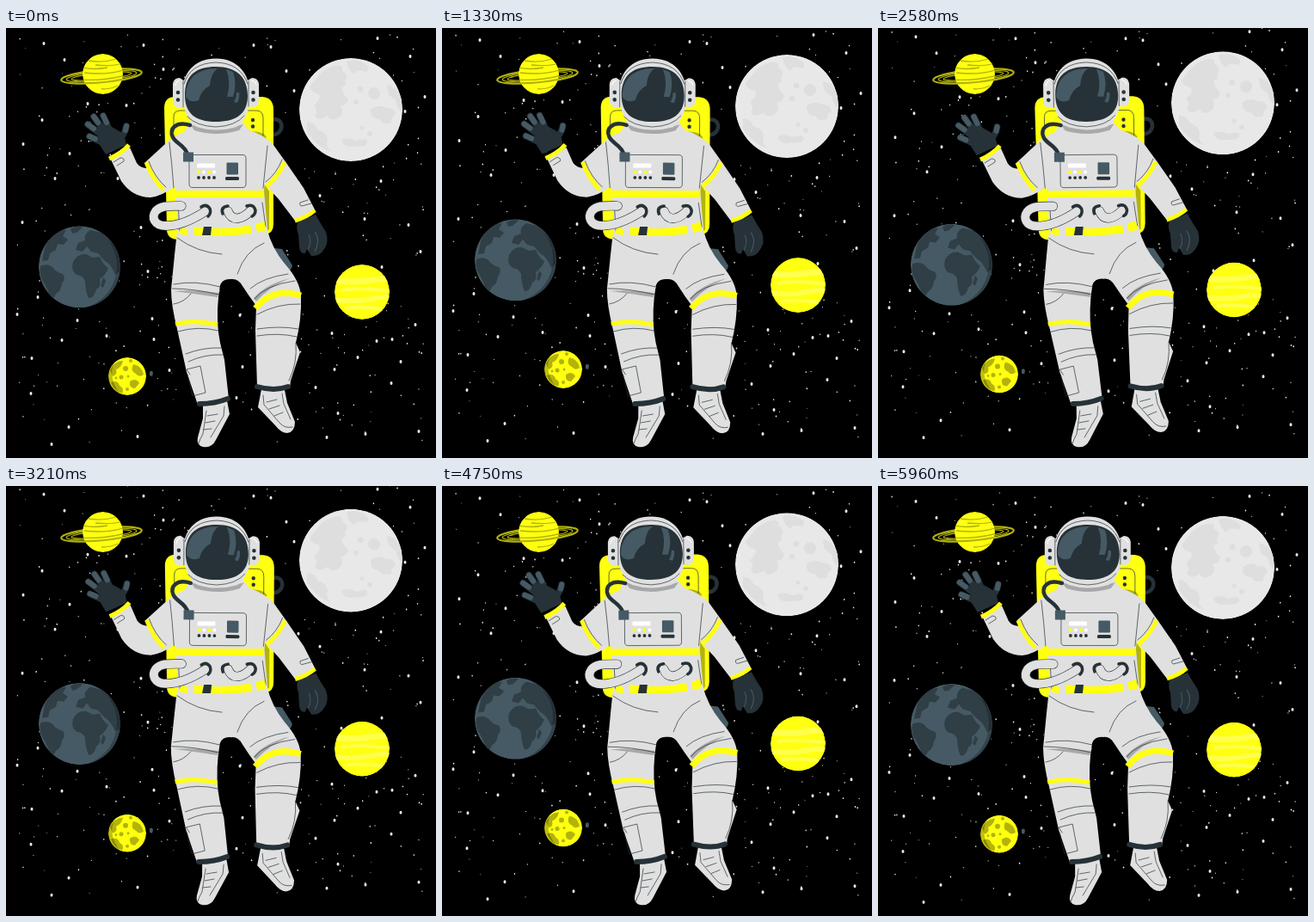
Write an HTML page that moves like this. It is 500x500 px and loops after 6 s.

```html
<!DOCTYPE html>
<html lang="en">
<head>
<meta charset="utf-8">
<title>Floating astronaut</title>
<style>
html, body { margin: 0; width: 100%; height: 100%; overflow: hidden; background: #000; }
svg { display: block; width: 100vw; height: 100vh; }
.suit { fill: #e0e0e0; }
.yellow { fill: #ffff10; }
.olive { fill: #b3b30b; }
.dark { fill: #263238; }
.slate { fill: #455a64; }
.white { fill: #fff; }
.line, .stripe, .cuff, .hose, .ring, .fingers, .tube { fill: none; }
.line { stroke: #263238; stroke-width: .7; stroke-linecap: round; stroke-linejoin: round; }
.stripe { stroke: #ffff10; stroke-width: 5; }
.wide { stroke-width: 7; }
.cuff { stroke: #263238; stroke-width: 6; stroke-linecap: round; }
.hose { stroke: #263238; stroke-width: 4.5; stroke-linecap: round; }
.ring { stroke: #263238; stroke-width: 3.5; stroke-linecap: round; }
.fingers { stroke: #263238; stroke-width: 7.5; stroke-linecap: round; }
.tips { stroke: #455a64; stroke-width: 6; }
.tube { stroke-width: 11; stroke: #263238; stroke-linecap: round; }
.core { stroke-width: 9.8; stroke: #e0e0e0; }
.band { fill: none; stroke: #b3b30b; stroke-width: 1.3; }
.shade { fill: #000; opacity: .25; }
</style>
</head>
<body>
<svg viewBox="0 0 500 500">
<defs>
  <clipPath id="moonClip"><circle cx="401" cy="95" r="60"/></clipPath>
  <clipPath id="earthClip"><circle cx="85.5" cy="277.8" r="47.5"/></clipPath>
  <clipPath id="sunClip"><circle cx="414" cy="307" r="32"/></clipPath>
  <clipPath id="rockClip"><circle cx="141" cy="405" r="22"/></clipPath>
  <clipPath id="saturnClip"><circle cx="112.5" cy="53.5" r="23.5"/></clipPath>
  <path id="tubes" d="M232 213C217 223 201 230 186 230C172 230 169 220 174 213C180 206 190 207 204 207M258 213C263 226 275 222 284 213"/>
</defs>

<path id="stars" fill="#ebebeb"/>

<g id="moon" clip-path="url(#moonClip)">
  <circle cx="401" cy="95" r="60" fill="#e8e8e8"/>
  <g fill="#dedede">
    <path d="M359 61Q368 47 382 44Q393 42 391 50Q400 54 394 62Q397 68 390 69Q393 80 398 82Q396 92 389 90Q394 99 387 104Q378 110 374 102Q363 110 359 101Q364 97 358 90Q367 83 364 77Q354 75 353 68Z"/>
    <path d="M396 39Q405 35 416 41Q425 46 419 51Q408 47 405 54Q397 48 396 39Z"/>
    <path d="M424 94Q434 88 441 93Q452 92 453 101Q447 104 448 110Q438 114 434 106Q423 106 424 94Z"/>
    <path d="M350 109Q360 110 362 118Q373 121 374 130Q371 138 379 144Q363 140 350 121Z"/>
    <path d="M443 66Q455 68 460 82L461 98Q454 92 453 83Q443 80 443 66Z"/>
    <circle cx="428" cy="76" r="7"/><circle cx="412" cy="71" r="3.5"/>
    <circle cx="366" cy="129" r="7"/><circle cx="407" cy="86" r="3"/>
    <circle cx="414" cy="116" r="2.5"/><circle cx="423" cy="123" r="3"/>
    <path d="M390 130Q399 126 407 131L417 129Q424 132 417 137L401 138Q393 139 390 130Z"/>
  </g>
</g>

<g id="earth" clip-path="url(#earthClip)">
  <circle cx="85.500" cy="277.8" r="47.5" class="slate"/>
  <g fill="#303e46">
    <path d="M40 277Q48 273 54 278Q58 284 66 286Q70 291 65 297Q64 306 58 309Q55 317 52 313Q47 301 44 296Q38 288 40 277Z"/>
    <path d="M78 272Q83 262 93 263L101 267L109 266Q114 277 119 279Q116 287 109 292Q111 301 105 304Q102 315 96 314Q92 305 92 294Q90 288 82 287Q75 282 78 272Z"/>
    <path d="M81 258L84 250L92 247Q90 240 98 235L111 238L125 252Q133 267 133 282L127 287Q122 274 114 270L107 262L99 260L94 254L89 260Z"/>
    <path d="M45 256Q50 243 62 236L70 235L66 242L72 246L67 252L60 251L58 258L51 262L49 270L42 271Z"/>
    <path d="M75 234Q82 229 89 232L82 238L77 239Z"/>
    <path d="M113 290L116 294L113 302L110 300Z"/>
  </g>
  <path class="shade" d="M108 236A47.5 47.5 0 0 1 92 325A50 50 0 0 0 108 236Z"/>
</g>

<g id="sun" clip-path="url(#sunClip)">
  <circle cx="414" cy="307" r="32" class="yellow"/>
  <g fill="none" stroke="#ffff4d">
    <path stroke-width="7" d="M380 293Q402 297 424 293T448 295"/>
    <path stroke-width="4" d="M390 305Q412 301 448 306M394 326Q414 323 438 327"/>
    <path stroke-width="6" d="M380 316Q404 319 424 315T448 316"/>
  </g>
</g>

<g id="rock">
  <path class="slate" d="M167 400Q170 397 171 401L170 405L167 404Z"/>
  <g clip-path="url(#rockClip)">
    <circle cx="141" cy="405" r="22" class="yellow"/>
    <g class="olive">
      <path d="M121 398Q127 386 136 387Q134 395 128 397Q130 403 124 405Z"/>
      <path d="M148 391Q158 393 160 403Q155 407 151 402Q144 399 148 391Z"/>
      <path d="M122 412Q130 409 132 416Q138 419 135 425Q126 422 122 412Z"/>
      <path d="M144 411Q151 406 155 413L150 419Q143 419 144 411Z"/>
      <circle cx="139" cy="396" r="3"/><circle cx="134" cy="406" r="2.5"/>
      <circle cx="142" cy="405" r="1.5"/><circle cx="141" cy="420" r="2"/>
      <circle cx="145" cy="387" r="2"/><circle cx="128" cy="407" r="1.4"/>
    </g>
    <path class="shade" d="M128 386Q116 405 134 427L118 425L116 390Z"/>
  </g>
</g>

<g id="saturn">
  <g class="band" transform="rotate(-5.5 111 56)">
    <ellipse cx="111" cy="56" rx="47" ry="7.5" stroke-width="2.2"/>
    <ellipse cx="111" cy="56" rx="41" ry="5.6"/>
    <ellipse cx="111" cy="56" rx="35" ry="4"/>
  </g>
  <g class="band" clip-path="url(#saturnClip)">
    <circle cx="112.5" cy="53.5" r="23.5" class="yellow" stroke="none"/>
    <path d="M96 38Q112 41 128 36M88 46Q103 49 118 46M104 43Q124 45 135 41M91 52Q116 55 136 49M111 71Q123 71 130 67M86 60Q112 62 139 55"/>
    <path stroke-width="2" d="M86 64Q112 65 139 59"/>
  </g>
</g>

<g id="astronaut">
  <!-- backpack -->
  <path class="hose" d="M308 107C323 102 325 122 311 124"/>
  <path class="yellow" d="M184 93Q184 80 197 80H298Q311 81 311 95V228Q311 239 301 240L201 246Q187 246 187 234Z"/>
  <path class="olive" d="M300 181L306 190V234L300 239ZM278 121Q298 118 303 127L298 132Z"/>
  <path class="line" d="M195 121V103Q195 96 203 96H220M273 96H291Q299 96 299 105V125"/>
  <g class="dark"><circle cx="287" cy="107" r="2.2"/><circle cx="287" cy="114.5" r="2.2"/></g>
  <path class="slate" d="M312 256L321 257L333 276Q332 283 325 284Z"/>

  <!-- boots -->
  <path class="suit" d="M229 438L257 433L260 449L244 479Q239 489 229 487Q221 485 223 476L229 454Z"/>
  <path class="suit" d="M297 420L324 421L327 436L336 458Q336 470 327 471Q320 471 313 462L293 441Z"/>
  <path class="line" d="M233 445L229 472Q225 479 224 483M254 440L253 451L238 476M234 451L246 449M232 459L243 457M230 467L239 466M299 427L300 438L318 459Q324 466 333 464M321 425L323 437L331 455M303 435L315 432M306 443L318 439M312 451L322 447"/>

  <!-- legs -->
  <path class="suit" d="M199 236L303 232Q309 256 324 274Q342 294 343 312Q344 338 337 366L342 377L331 410L330 418L292 417L290 352L291 323Q282 311 275 300Q270 291 262 292Q252 291 249 299L247 313Q244 342 249 366L254 386L259 431L223 438L210 400L199 350Q192 322 192 304L196 264Z"/>
  <path class="shade" d="M195 306Q220 304 247 308L246 313Q219 309 195 306ZM288 314Q302 298 330 291Q306 301 291 318Z"/>
  <path class="line" d="M199 244Q222 261 251 263M300 250Q278 259 269 286M193 303Q218 303 248 310M195 298Q220 293 249 301M195 321Q207 319 215 309M284 303Q299 290 328 286M289 315Q301 299 336 294M200 353Q223 346 247 352M209 379Q229 371 251 372M212 388Q231 379 252 380M292 333Q316 320 342 321M292 350Q319 346 340 350M292 358Q317 354 338 359M214 403L210 397L226 393L232 424L217 428L211 403M337 366Q339 390 329 410"/>
  <path class="stripe" d="M197 344Q222 339 246 345"/>
  <path class="stripe wide" d="M290 326Q310 301 343 311"/>
  <path class="cuff" d="M225 437Q243 437 258 431M292 417Q312 423 328 417"/>

  <!-- waving arm -->
  <g class="fingers">
    <path d="M112 133L97 126M112 125L95 112M115 121L102 103M121 120L113 102M130 130Q138 125 140 114"/>
    <path class="tips" d="M104 129L97 126M102 117L95 112M107 110L102 103M117 110L113 102M139 119L140 114"/>
  </g>
  <path class="dark" d="M116 147L106 131L109 121L121 114L132 120L138 127L140 136Z"/>
  <path class="suit" d="M207 121Q192 127 185 135L162 156L165 163Q156 163 152 157L144 139L121 151L134 178Q147 197 168 197Q180 196 197 184Z"/>
  <path class="stripe" d="M120 152Q134 146 143 136M163 156Q170 175 183 188"/>
  <path class="line" d="M125 156L133 151Q138 151 137 155L129 160M166 155Q173 174 186 185"/>

  <!-- resting arm -->
  <path class="dark" d="M339 226L360 217Q366 228 372 237Q376 249 370 257Q365 266 355 265L350 257L348 262Q342 263 341 255L340 240Q337 233 339 226Z"/>
  <path fill="none" stroke="#455a64" d="M359 237Q366 247 359 260M352 240Q356 249 351 258"/>
  <path class="suit" d="M282 119Q303 126 311 136L326 157L346 186L360 213L336 224L317 199L302 183Z"/>
  <path class="stripe" d="M324 156Q317 172 303 184M336 224Q350 220 359 212"/>
  <path class="line" d="M351 200L342 203Q341 207 344 207L355 204M321 153Q315 169 302 179"/>

  <!-- torso -->
  <path class="suit" d="M207 121L216 106H272L283 119Q297 123 306 133L300 189L304 235Q252 244 200 239L197 188L189 133Q198 125 207 121Z"/>
  <path class="shade" d="M214 112Q244 122 276 112L271 119Q244 127 219 119Z"/>
  <path class="line" d="M190 133Q193 158 195 186M304 137L299 186M200 203L202 236M298 203L302 231"/>
  <path class="yellow" d="M194 189H299L299 197H195Z"/>
  <path class="yellow" d="M204 232L212 234L210 241L200 239ZM218 231Q252 236 284 229L286 239Q254 243 219 241ZM290 228L300 225L303 235L292 238Z"/>
  <path class="dark" d="M230 231L239 231L238 241L228 241Z"/>

  <!-- control panel -->
  <rect class="line" x="213" y="147.5" width="66" height="38" rx="4"/>
  <rect class="white" x="222" y="157.5" width="21" height="5" rx="1"/>
  <g class="yellow"><circle cx="224" cy="167.5" r="2"/><circle cx="236" cy="167.5" r="2"/></g>
  <g class="white"><circle cx="230" cy="167.5" r="2"/><circle cx="242" cy="167.5" r="2"/></g>
  <g class="dark">
    <circle cx="224" cy="174" r="1.9"/><circle cx="230" cy="174" r="1.9"/>
    <circle cx="236" cy="174" r="1.9"/><circle cx="242" cy="174" r="1.9"/>
    <rect x="255" y="173" width="16" height="4" rx="1.5"/>
  </g>
  <rect class="slate" x="256.5" y="156.5" width="13.5" height="14" rx="1"/>

  <!-- tubes -->
  <use href="#tubes" class="tube"/>
  <use href="#tubes" class="tube core"/>
  <path class="ring" d="M227 208Q233 204 237 210Q239 215 235 219M252 216Q249 208 258 207M280 207Q288 204 290 212Q290 217 286 219"/>

  <!-- helmet -->
  <path class="suit" d="M194 65Q195 58 202 58L208 62V91L201 93Q194 91 194 85ZM279 62L286 58Q293 58 294 65V85Q293 92 286 92L279 90Z"/>
  <path class="suit" d="M205 78C204 53 219 35.5 244 35.5C270 35.5 284 54 284 79C284 99 274 111 268 115Q244 122 222 115C213 109 206 97 205 78Z"/>
  <path class="line" d="M207 65Q214 41 244 40Q273 41 281 65M211 103Q221 114 244 115Q267 114 277 102M206 62V92M282 62V91"/>
  <path class="dark" d="M208 78C208 54 222 45 244 45C268 45 281 57 281 79C281 101 266 109 244 109C220 109 208 99 208 78Z"/>
  <path class="slate" d="M209 80C209 59 222 47 246 47Q238 53 237 67Q227 72 224 84Q214 88 209 80Z"/>
  <path class="slate" d="M256 48L264 51Q269 65 264 80H257Q262 63 256 48ZM268 75L271 75Q272 81 269 87L265 86Q268 81 268 75Z"/>
  <g class="dark">
    <circle cx="200" cy="75" r="2.3"/><circle cx="200" cy="83.5" r="2.3"/>
    <circle cx="287.5" cy="75" r="2.3"/><circle cx="287.5" cy="83.5" r="2.3"/>
  </g>
  <path fill="none" stroke="#fff" d="M197 67Q198 61 202 61M285 61Q289 61 291 66"/>

  <!-- air hose -->
  <path class="hose" d="M214 113C198 108 189 117 194 127C198 135 208 136 211 147"/>
  <rect class="slate" x="206" y="144.5" width="12" height="11"/>
</g>
</svg>
<script>
const el = id => document.getElementById(id);

const bigStars = [
  42,107, 29,425, 464,97, 468,229, 432,12, 68,37, 74,146, 19,226, 37,313, 117,358,
  65,363, 53,484, 153,475, 373,476, 459,388, 449,362, 382,397, 409,383, 482,260, 379,355,
  431,364, 448,413, 386,448, 418,472, 476,345, 30,384, 165,283, 130,175, 157,232, 340,180,
  365,195, 417,222, 437,278, 390,290, 44,18, 95,88, 140,90, 160,20, 183,48, 288,20,
  308,22, 335,73, 326,50, 470,33, 487,80, 436,178, 357,240, 20,135, 57,175, 83,340,
  170,338, 190,398, 73,464, 272,334, 268,430, 275,394, 360,418, 480,469, 172,362, 13,333
];

let seed = 11;
const random = () => (seed = seed * 16807 % 2147483647) / 2147483647;
const dot = (x, y, rx, ry) =>
  `M${x - rx} ${y}a${rx} ${ry} 0 1 0 ${2 * rx} 0a${rx} ${ry} 0 1 0 ${-2 * rx} 0`;

let sky = "";
for (let i = 0; i < bigStars.length; i += 2) sky += dot(bigStars[i], bigStars[i + 1], 1.5, 1.9);
for (let i = 0; i < 380; i++) {
  const r = .4 + random() * .45;
  sky += dot(13 + random() * 473, 8 + random() * 478, r, r * 1.2);
}
el("stars").setAttribute("d", sky);

// Linear rise and fall, 9 px high
const bob = (t, period) => -9 * (1 - Math.abs(1 - 2 * (t % period) / period));

// Linear tilt 0 -> 1 -> -1 -> 0 degrees
const tilt = p => p < .25 ? 4 * p : p < .75 ? 2 - 4 * p : 4 * p - 4;

const lift = (id, y) => el(id).setAttribute("transform", `translate(0 ${y})`);

function draw() {
  const t = performance.now() % 6000;
  for (const id of ["stars", "moon"]) lift(id, bob(t, 6000));
  for (const id of ["earth", "sun", "rock"]) lift(id, bob(t, 3000));
  el("astronaut").setAttribute("transform", `rotate(${tilt(t % 3000 / 3000)} 232.5 261.5)`);
  requestAnimationFrame(draw);
}
draw();
</script>
</body>
</html>
```
